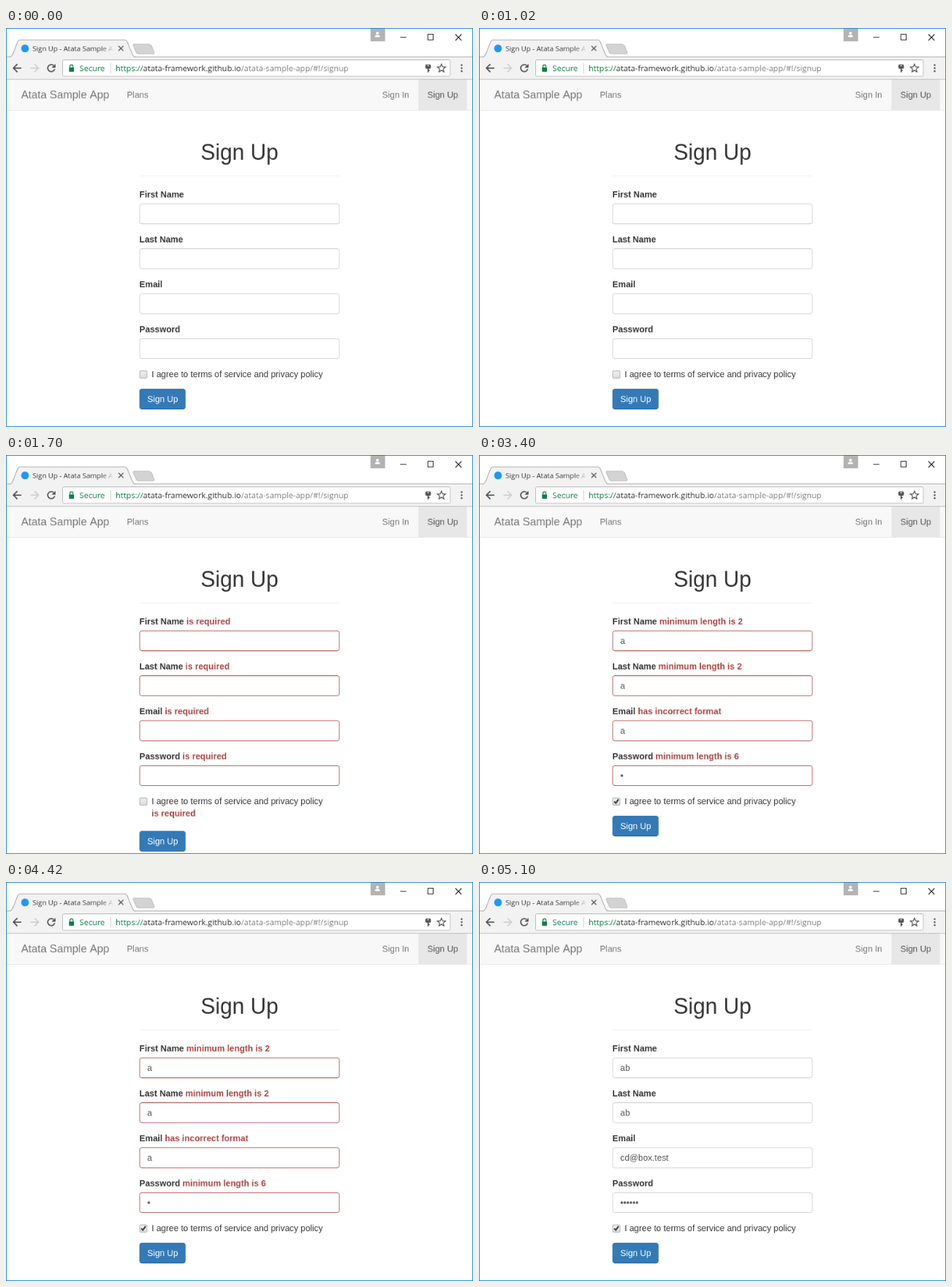
Recreate the animation shown at these times as an HTML page with a canvas. Size 639 by 545 pixels, loop 6800 ms.

```html
<!DOCTYPE html>
<html lang="en">
<head>
<meta charset="utf-8">
<title>Sign Up</title>
<style>
  html, body { margin: 0; width: 100%; height: 100%; overflow: hidden; background: #fff; }
  canvas { display: block; width: 639px; height: 545px; }
</style>
</head>
<body>
<canvas id="stage" width="639" height="545"></canvas>
<script>
const stage = document.getElementById('stage').getContext('2d');

// The window is laid out at its natural size, then scaled down to the stage.
const W = 770, H = 657, STEP = 1700;
const page = document.createElement('canvas');
page.width = W;
page.height = H;
const ctx = page.getContext('2d');

const UI = '"Open Sans", sans-serif';
const SANS = '"Liberation Sans", Arial, sans-serif';
const BODY = '14.28px ' + SANS, BOLD = 'bold 14.22px ' + SANS;
const RED = '#a94442', INK = '#333', ICON = '#505050';

const LABELS = ['First Name', 'Last Name', 'Email', 'Password'];
const NONE = ['', '', '', ''];
const REQUIRED = 'is required', SHORT = 'minimum length is ';
const STATES = [
  { values: NONE, errors: NONE },
  { values: NONE, errors: LABELS.map(() => REQUIRED), termsError: true },
  { values: ['a', 'a', 'a', '•'], agreed: true,
    errors: [SHORT + 2, SHORT + 2, 'has incorrect format', SHORT + 6] },
  { values: ['ab', 'ab', 'cd@box.test', '••••••'], agreed: true, errors: NONE }
];

function rect(x, y, w, h, color) {
  ctx.fillStyle = color;
  ctx.fillRect(x, y, w, h);
}

// Returns the x position where the text ends.
function text(str, x, y, font, color) {
  ctx.font = font;
  ctx.fillStyle = color;
  ctx.fillText(str, x, y);
  return x + ctx.measureText(str).width;
}

function box(x, y, w, h, r, fill, border) {
  ctx.beginPath();
  ctx.roundRect(x + 0.5, y + 0.5, w - 1, h - 1, r);
  ctx.fillStyle = fill;
  ctx.fill();
  ctx.lineWidth = 1;
  ctx.strokeStyle = border;
  ctx.stroke();
}

function disc(x, y, r, color) {
  ctx.beginPath();
  ctx.arc(x, y, r, 0, 2 * Math.PI);
  ctx.fillStyle = color;
  ctx.fill();
}

function trace(points) {
  ctx.beginPath();
  points.forEach(([x, y]) => ctx.lineTo(x, y));
}

function line(points, color, width = 1) {
  trace(points);
  ctx.strokeStyle = color;
  ctx.lineWidth = width;
  ctx.stroke();
}

function cross(x, y, r, color, width) {
  line([[x - r, y - r], [x + r, y + r]], color, width);
  line([[x + r, y - r], [x - r, y + r]], color, width);
}

function arrow(x, dir, color) {
  line([[x - 6.5 * dir, 66], [x + 6 * dir, 66]], color, 2);
  line([[x, 59.5], [x + 6.5 * dir, 66], [x, 72.5]], color, 2);
}

function star(x, y, r) {
  const points = [];
  for (let i = 0; i < 10; i++) {
    const a = i * Math.PI / 5 - Math.PI / 2, d = i % 2 ? r * 0.45 : r;
    points.push([x + d * Math.cos(a), y + d * Math.sin(a)]);
  }
  trace(points);
  ctx.closePath();
  ctx.strokeStyle = ICON;
  ctx.lineWidth = 1.4;
  ctx.stroke();
}

function drawTabs() {
  rect(601, 1, 24, 21, '#b3b3b3');
  disc(612.5, 8.5, 2.3, '#fff');
  ctx.beginPath();
  ctx.roundRect(608.5, 11.5, 8, 3.5, [2.5, 2.5, 0, 0]);
  ctx.fill();

  rect(650, 15, 10, 1, '#000');
  ctx.strokeStyle = '#000';
  ctx.lineWidth = 1;
  ctx.strokeRect(695.5, 10.5, 9, 9);
  cross(746, 15.5, 5, '#000', 1.1);

  trace([[211.5, 26.5], [236, 26.5], [240, 29], [244.5, 41], [243.5, 42.5], [218, 42.5], [215, 41], [209.5, 28]]);
  ctx.closePath();
  ctx.fillStyle = '#d3d3d3';
  ctx.fill();
  ctx.strokeStyle = '#bcbcbc';
  ctx.stroke();

  rect(1, 47, W - 2, 1, '#adadad');
  rect(1, 48, W - 2, 36, '#f2f2f2');
  ctx.beginPath();
  ctx.moveTo(6, 48);
  ctx.quadraticCurveTo(9.5, 47, 11, 43.5);
  ctx.lineTo(19, 23);
  ctx.quadraticCurveTo(20.5, 19.5, 24, 19.5);
  ctx.lineTo(195, 19.5);
  ctx.quadraticCurveTo(198.5, 19.5, 200, 23);
  ctx.lineTo(208.5, 43.5);
  ctx.quadraticCurveTo(210, 47, 213, 48);
  ctx.fillStyle = '#f2f2f2';
  ctx.fill();
  ctx.strokeStyle = '#a3a3a3';
  ctx.stroke();

  disc(31.3, 33.7, 6.4, '#2196f3');
  const fade = ctx.createLinearGradient(156, 0, 178, 0);
  fade.addColorStop(0, INK);
  fade.addColorStop(1, '#f2f2f2');
  text('Sign Up - Atata Sample A', 43.8, 38, '11.57px ' + UI, fade);
  cross(189.5, 33.5, 4, '#5a5a5a', 1.7);
}

function drawToolbar() {
  arrow(18.7, -1, ICON);
  arrow(47, 1, '#cfcfcf');
  ctx.beginPath();
  ctx.arc(74.7, 66, 5.8, 0.25, 5.4);
  ctx.strokeStyle = ICON;
  ctx.lineWidth = 2;
  ctx.stroke();
  trace([[81.7, 59], [81.7, 65.3], [75.3, 65.3]]);
  ctx.fillStyle = ICON;
  ctx.fill();

  box(93, 52, 640, 28, 2, '#fff', '#b5b5b5');
  const green = '#0b8043', font = '13.3px ' + UI;
  rect(104, 65, 8, 7, green);
  ctx.beginPath();
  ctx.moveTo(105.5, 65);
  ctx.arc(108, 63, 2.5, Math.PI, 0);
  ctx.lineTo(110.5, 65);
  ctx.strokeStyle = green;
  ctx.lineWidth = 1.3;
  ctx.stroke();
  text('Secure', 121.2, 71, font, green);
  rect(172, 58, 1, 17, '#c4c4c4');
  let x = text('https://', 180.7, 71, font, green);
  x = text('atata-framework.github.io', x, 71, font, INK);
  text('/atata-sample-app/#!/signup', x, 71, font, '#808080');

  ctx.beginPath();
  ctx.roundRect(691.5, 60, 9, 7, 2);
  ctx.fillStyle = ICON;
  ctx.fill();
  rect(695, 67, 2, 6, ICON);
  rect(697, 69, 1.5, 2, ICON);
  rect(694.5, 61.5, 3, 1.5, '#fff');
  star(718, 66.5, 7);
  [61, 66, 71].forEach(y => disc(751.3, y, 1.5, ICON));
  rect(1, 84, W - 2, 1, '#b3b3b3');
}

function drawNav() {
  rect(1, 85, W - 2, 50, '#f8f8f8');
  rect(680, 85, 80, 50, '#e7e7e7');
  rect(1, 135, W - 2, 1, '#e7e7e7');
  text('Atata Sample App', 25, 116, '18.05px ' + SANS, '#777');
  text('Plans', 199.2, 115, BODY, '#777');
  text('Sign In', 620.3, 115, BODY, '#777');
  text('Sign Up', 694.7, 115, BODY, '#555');
}

function drawField(label, value, error, i) {
  const top = 289 + 74 * i;
  const x = text(label + ' ', 220, top - 10, BOLD, INK);
  text(error, x, top - 10, BOLD, RED);
  box(220, top, 330, 34, 3.5, '#fff', error ? RED : '#ccc');
  text(value, 233, top + 22, BODY, '#555');
}

function drawForm(state) {
  text('Sign Up', 321, 217, '36px ' + SANS, INK);
  rect(220, 243, 330, 1, '#eee');
  LABELS.forEach((label, i) => drawField(label, state.values[i], state.errors[i], i));

  const shade = ctx.createLinearGradient(0, 564, 0, 577);
  shade.addColorStop(0, '#f0f0f0');
  shade.addColorStop(1, '#dcdcdc');
  box(220, 564, 13, 13, 1.5, shade, '#a6a6a6');
  if (state.agreed) line([[223, 570.5], [225.6, 573.2], [230, 567]], INK, 2.2);
  text('I agree to terms of service and privacy policy', 240, 575, BODY, INK);
  if (state.termsError) text(REQUIRED, 240, 595, BOLD, RED);

  const top = state.termsError ? 619 : 594;
  box(220, top, 76, 34, 3.5, '#337ab7', '#2e6da4');
  text('Sign Up', 233, top + 22, BODY, '#fff');
}

function draw(state) {
  rect(0, 0, W, H, '#fff');
  drawTabs();
  drawToolbar();
  drawNav();
  drawForm(state);
  ctx.strokeStyle = '#1883d7';
  ctx.lineWidth = 1;
  ctx.strokeRect(0.5, 0.5, W - 1, H - 1);

  stage.imageSmoothingQuality = 'high';
  stage.drawImage(page, 0, 0, 639, 545);
}

const start = performance.now();
let shown = -1;

function tick() {
  const elapsed = Math.max(0, performance.now() - start);
  const step = Math.floor(elapsed / STEP) % STATES.length;
  if (step !== shown) draw(STATES[shown = step]);
  requestAnimationFrame(tick);
}
tick();
</script>
</body>
</html>
```
